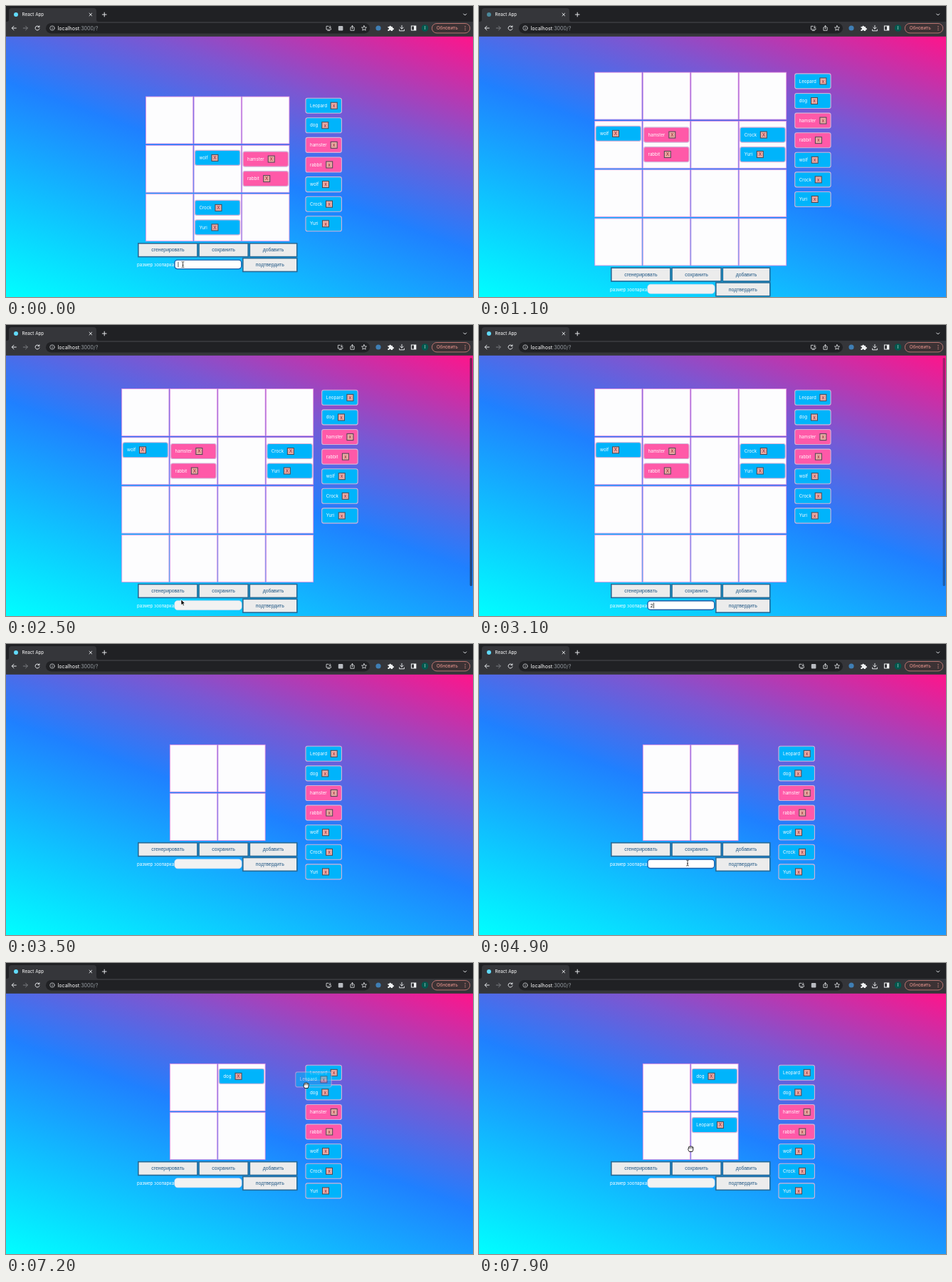
An HTML page that plays this animation: 656x408 px, repeating every 8000 ms.

```html
<!DOCTYPE html>
<html lang="ru">
<head>
<meta charset="utf-8">
<title>React App</title>
<style>
  html, body { margin: 0; width: 100%; height: 100%; overflow: hidden; }
  body { background: linear-gradient(20deg, #0ff, #1f80ff 50%, #7b57d2 72%, #ff148a) 0 42px / 656px 366px no-repeat; }
  svg { position: absolute; left: 0; top: 0; display: block; }
  text { font: 6.15px Inter, "Open Sans", sans-serif; fill: #fff; white-space: pre; }
  .btn { font: 6.83px "Liberation Sans", Arial, sans-serif; fill: #1d5583; text-anchor: middle; }
  .val { font: 6.83px "Liberation Sans", Arial, sans-serif; fill: #111; }
  .x { font: 6.4px "Liberation Sans", Arial, sans-serif; fill: #8c1a2b; text-anchor: middle; }
  .line { fill: none; stroke: #e4e6e9; stroke-width: 1; stroke-linecap: round; stroke-linejoin: round; }
</style>
</head>
<body>
<svg width="656" height="408" viewBox="0 0 656 408">
  <defs>
    <clipPath id="view"><rect y="42" width="656" height="366"/></clipPath>
    <g id="arrow"><path d="M0 0V7.6L1.8 6L3 8.7L4.3 8.1L3.1 5.5H5.5Z" fill="#000" stroke="#fff" stroke-width=".6"/></g>
    <g id="ibeam" fill="none" stroke="#222" stroke-width=".8"><path d="M-1.8 -4Q0 -4 0 -3V3Q0 4 -1.8 4M1.8 -4Q0 -4 0 -3M0 3Q0 4 1.8 4M-1 .9H1"/></g>
    <g id="hand">
      <path d="M-2.2 4L-3.8 1Q-4.1 -.6 -2.8 -.3L-3 -2.4Q-2.5 -3.7 -1.6 -3Q-.6 -4.4 .3 -3.2Q1.5 -4 2 -2.7Q3.5 -3 3.5 -1.4L3.2 1.6L2.3 4Z" fill="#fff" stroke="#111" stroke-width=".9" stroke-linejoin="round"/>
      <path d="M-1.5 -2.8V-.2M.3 -3V-.2M2 -2.5V-.2" stroke="#222" stroke-width=".7"/>
    </g>
  </defs>

  <g clip-path="url(#view)"><g id="page"></g></g>

  <rect width="656" height="42.8" fill="#35363a"/>
  <path d="M0 0H656V22H130Q127 22 127 19V7Q127 3 123 3H8Q4 3 4 7V19Q4 22 1 22H0Z" fill="#202124"/>
  <circle id="icon" cx="14" cy="12" r="3" fill="#61dafb"/>
  <text x="22.5" y="14.2" style="font-size:6.3px">React App</text>
  <path class="line" d="M117 10.2L120.6 13.8M120.6 10.2L117 13.8M135.3 12H141.1M138.2 9.1V14.9M642.7 11L644.7 13L646.7 11"/>

  <rect x="56" y="24" width="455" height="14.4" rx="7.2" fill="#202124"/>
  <path class="line" d="M14.3 31H8.3M11 28.2L8.2 31L11 33.8"/>
  <path class="line" style="stroke:#7b7d81" d="M24.3 31H30.3M27.6 28.2L30.4 31L27.6 33.8"/>
  <path class="line" d="M46.6 29.3A3 3 0 1 0 47 31.8M46.9 27.8V29.6H45"/>
  <g class="line" style="stroke-width:.8;stroke:#c4c7cb"><circle cx="65" cy="31" r="3.2"/><path d="M65 30.8V32.6M65 29.3V29.4"/></g>
  <text x="72.5" y="33.6" style="font-size:7.17px">localhost<tspan fill="#9aa0a6">:3000/?</tspan></text>
  <g id="install" class="line" style="stroke-width:.8"><path d="M453 28.3H450V33H456.6V31.7M451.8 34.5H454.9M455.2 28V30.8M453.9 29.7L455.2 31L456.5 29.7"/></g>
  <rect id="lang" x="466.8" y="28" width="6.6" height="6.4" rx="1" fill="#b9bcc1"/>
  <path class="line" style="stroke-width:.8" d="M485 30H483.9V34.3H489.1V30H488M486.5 32V27.6M485.1 29L486.5 27.5L487.9 29"/>
  <path class="line" style="stroke-width:.8" d="M503 27.6L504 29.9L506.5 30.1L504.6 31.8L505.2 34.2L503 32.9L500.8 34.2L501.4 31.8L499.5 30.1L502 29.9Z"/>
  <circle cx="523" cy="31" r="3.6" fill="#3f7fb5"/>
  <path d="M536.4 29.1H538.4A1.3 1.3 0 1 1 541 29.1H543V31A1.3 1.3 0 1 1 543 33.4V35H540.8A1.2 1.2 0 1 0 538.4 35H536.4V32.9A1.2 1.2 0 1 0 536.4 30.6Z" fill="#f1f3f4"/>
  <path class="line" d="M556 27.3V32M553.8 30L556 32.2L558.2 30M552.6 33V34.8H559.4V33"/>
  <rect x="569.4" y="28" width="6.4" height="6" fill="none" stroke="#f1f3f4"/>
  <path d="M573 28H576V34H573Z" fill="#f1f3f4"/>
  <circle cx="588.5" cy="31" r="4.8" fill="#00594f"/>
  <text x="588.5" y="33" text-anchor="middle" style="font-size:5.5px">I</text>
  <rect x="598.3" y="24.5" width="53.4" height="13.4" rx="6.7" fill="#3c3234" stroke="#d9857f" stroke-width=".8"/>
  <text x="604.8" y="33.2" style="font-size:6.3px;fill:#f29b93">Обновить</text>
  <g fill="#f29b93"><circle cx="645" cy="28.6" r=".7"/><circle cx="645" cy="31.1" r=".7"/><circle cx="645" cy="33.6" r=".7"/></g>

  <rect id="bar" x="651.6" y="46" width="3.2" height="320" rx="1.6" fill="#1d2230" opacity="0"/>
  <g id="top"></g>
</svg>

<script>
const LOOP = 8000, STEP = 100, PX = 67.6, PY = 68.3;
const $ = id => document.getElementById(id);
const BLUE = '#00b4fb', PINK = '#ff59a8';

// name: [fill, distance from the label to the centre of its button]
const pets = {
  Leopard: [BLUE, 33.7], dog: [BLUE, 21.3], hamster: [PINK, 33.7], rabbit: [PINK, 27.2],
  wolf: [BLUE, 22], Crock: [BLUE, 27], Yuri: [BLUE, 22]
};
const names = Object.keys(pets);

// grid size: [grid top, list left, first list card centre]
const layouts = { 2: [141, 421, 153.8], 3: [126.8, 421, 139.7], 4: [92.8, 443.7, 105.4] };

// time, x, y, shape; an empty shape hides the pointer
const moves = [
  [0, 248.5, 362.5, 'ibeam'], [700, 248.5, 362.5, ''],
  [1800, 248, 364, 'arrow'], [2200, 246, 385, 'arrow'], [2500, 246, 385, 'arrow'],
  [2700, 247, 393, 'ibeam'], [3100, 247, 393, ''],
  [3900, 247, 388, 'arrow'], [4300, 293, 307, 'ibeam'], [4900, 293, 307, 'ibeam'],
  [5000, 298, 302, 'arrow'],
  [5500, 434, 182, 'hand'], [5700, 434, 182, 'hand'], [6200, 312, 180, 'hand'],
  [6300, 312, 180, 'hand'], [6600, 433, 160, 'hand'], [6900, 436, 162, 'hand'],
  [7100, 436, 162, 'hand'], [7600, 299, 254, 'hand'], [7700, 299, 254, 'hand'],
  [7900, 297.5, 260.5, 'hand'], [8000, 297.5, 260.5, 'hand']
];

const within = (t, ...spans) => spans.some(([a, b]) => t >= a && t < b);
const ease = p => p * p * (3 - 2 * p);
const box = (x, y, w, h, fill, more = '') =>
  `<rect x="${x}" y="${y}" width="${w}" height="${h}" fill="${fill}" ${more}/>`;
const label = (x, y, s, cls = '') => `<text x="${x}" y="${y}" class="${cls}">${s}</text>`;

function card(name, x, cy, w, mark) {
  const [fill, gap] = pets[name], bx = x + 6 + gap;
  return box(x, cy - 10.5, w, 21, fill, 'rx="2.6" stroke="#d3b2d8" stroke-width="1.1"') +
    label(x + 6, cy + 2.1, name) +
    box(bx - 4.5, cy - 4.5, 9, 9, '#e9a9a2', 'stroke="#4d4650"') +
    label(bx, cy + 2.2, mark, 'x');
}

function button(x, y, w, s) {
  return box(x + .8, y + .8, w - 1.6, 18.8, '#ececec', 'stroke="#256a96" stroke-width="1.6"') +
    label(x + w / 2, y + 12.4, s, 'btn');
}

function zoo(t, n) {
  if (n > 2) return { 4: ['wolf'], 5: ['hamster', 'rabbit'], 7: ['Crock', 'Yuri'] };
  return { 1: t >= 6200 ? ['dog'] : [], 3: t >= 7700 ? ['Leopard'] : [] };
}

function form(t, y) {
  const focus = within(t, [0, 900], [2700, 3500], [4400, 5600]);
  const caret = within(t, [0, 400], [700, 900], [2700, 3500], [4400, 4900]);
  const value = within(t, [700, 900]) ? '4' : within(t, [3100, 3500]) ? '2' : '';
  let s = button(185, y, 84.7, 'сгенерировать') + button(270.2, y, 70.8, 'сохранить') +
    button(341.5, y, 68, 'добавить') + button(332, y + 20.8, 77.6, 'подтвердить') +
    label(184, y + 33.2, 'размер зоопарка');
  s += focus
    ? box(236.9, y + 24.1, 93.8, 12.5, '#fff', 'rx="4" stroke="#1a60aa" stroke-width="1.4"')
    : box(236.8, y + 23.9, 94.2, 13, '#f2f2f2', 'rx="4.2" stroke="#dcdcec" stroke-width=".6"');
  s += label(240.8, y + 33, value, 'val');
  if (caret) s += box(value ? 245 : 241.6, y + 26.6, .7, 7.8, '#111');
  return s;
}

function page(t, n) {
  const [top, listX, listY] = layouts[n], left = 297.2 - n * PX / 2, held = zoo(t, n);
  let s = '';
  for (let i = 0; i < n * n; i++) {
    const x = left + .7 + i % n * PX, y = top + Math.floor(i / n) * PY, pair = held[i] || [];
    s += box(x, y + .3, 66.2, 65.9, '#fdfdfe', 'stroke="#e58be0" stroke-width=".8"');
    const first = y + (pair.length > 1 ? 19.5 : 17.8);
    pair.forEach((name, k) => s += card(name, x + 1.3, first + k * 27.5, 63.4, 'X'));
  }
  names.forEach((name, k) => s += card(name, listX, listY + k * 27.6, 50.4, 'x'));
  return s + form(t, top + n * PY + .3);
}

function pointer(t) {
  const i = moves.findLastIndex(m => m[0] <= t), a = moves[i], b = moves[i + 1] || a;
  const p = b[0] > a[0] ? ease((t - a[0]) / (b[0] - a[0])) : 0;
  return { x: a[1] + (b[1] - a[1]) * p, y: a[2] + (b[2] - a[2]) * p, kind: a[3] };
}

function overlay(t) {
  const { x, y, kind } = pointer(t);
  let s = '';
  const drag = within(t, [5800, 6200]) ? ['dog', 434, 181.4, 182]
    : within(t, [7200, 7700]) ? ['Leopard', 436, 153.8, 162] : null;
  if (drag) {
    const [name, gx, cy, gy] = drag;
    s += `<g opacity=".6">${card(name, 421 + x - gx, cy + y - gy, 50.4, 'x')}</g>`;
  }
  if (kind) s += `<use href="#${kind}" x="${x}" y="${y}"/>`;
  return s;
}

function draw(t) {
  const n = t < 900 ? 3 : t < 3500 ? 4 : 2;
  const reloaded = within(t, [900, 3500]);
  $('page').innerHTML = page(t, n);
  $('page').setAttribute('transform', `translate(0 ${within(t, [2500, 3500]) ? -3.6 : 0})`);
  $('top').innerHTML = overlay(t);
  $('icon').setAttribute('opacity', within(t, [900, 1800]) ? .5 : 1);
  $('lang').setAttribute('opacity', reloaded ? 0 : 1);
  $('install').setAttribute('transform', `translate(${reloaded ? 16.4 : 0} 0)`);
  const fade = Math.min(1, Math.max(0, (3300 - t) / 300));
  $('bar').setAttribute('opacity', t < 2500 ? 0 : .6 * fade);
}

const start = performance.now();
let last = -1;
function frame() {
  const t = Math.floor((performance.now() - start) % LOOP / STEP) * STEP;
  if (t !== last) draw(last = t);
  requestAnimationFrame(frame);
}
frame();
</script>
</body>
</html>
```
